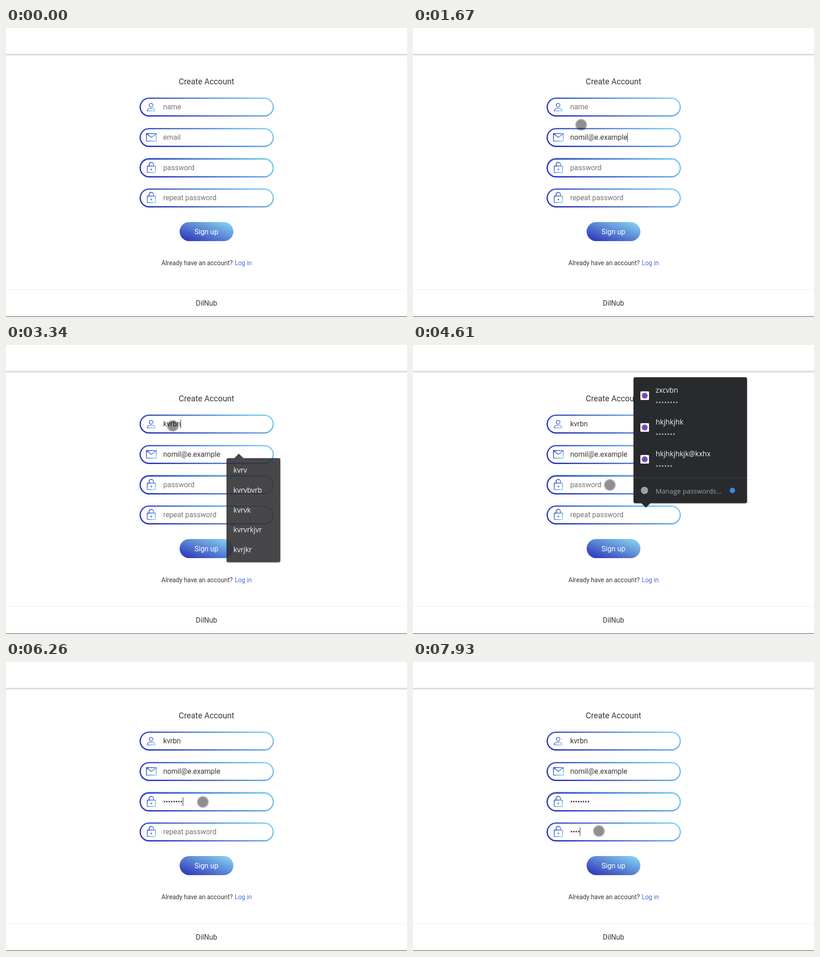
An HTML page that plays this animation: 880 by 636 pixels, repeating every 8000 ms.

```html
<!DOCTYPE html>
<html lang="en">
<head>
<meta charset="utf-8">
<title>Create Account</title>
<style>
  html, body { margin: 0; width: 100%; height: 100%; overflow: hidden; background: #fff; }
  #stage { position: relative; width: 880px; height: 636px; overflow: hidden; background: #fff;
    font: 15.75px/20px Roboto, sans-serif; color: #38383c; white-space: pre; }
  #stage div, #stage svg { position: absolute; }
  .center { left: 0; width: 880px; text-align: center; }
  .header { left: -10px; width: 900px; top: 0; height: 57px; background: #fff;
    box-shadow: 0 1px 5px rgba(0, 0, 0, .32); }
  .title { top: 108px; font-size: 17.75px; }
  .field { left: 292.7px; width: 295px; height: 42.3px; border-radius: 21.2px;
    background: linear-gradient(25deg, #292cb6, #8adcf4); }
  .field::before { content: ""; position: absolute; inset: 3.2px; border-radius: 18px; background: #fff; }
  .field svg { left: 14.3px; top: 9.2px; width: 24px; height: 24px; overflow: visible;
    fill: none; stroke: url(#ink); stroke-width: 1.7; }
  .field .value { left: 52.3px; top: 11.2px; }
  .hint { color: #757575; }
  .caret { display: inline-block; width: 1px; height: 19px; margin-right: -1px;
    vertical-align: top; background: #222; }
  .button { left: 380.5px; top: 427px; width: 118.3px; height: 42.2px; border-radius: 21.1px;
    line-height: 43px; text-align: center; color: #fff;
    background: linear-gradient(to top right, #292cb6, #8adcf4); }
  .login { left: 341px; top: 507px; font-size: 13.8px; }
  .link { left: 502px; color: #3c6bdc; }
  .footer { top: 575px; height: 60px; line-height: 60px; border-top: 1px solid #eee; box-sizing: border-box; }
  .edge { left: 0; top: 635px; width: 880px; height: 1px; background: #343735; }
  .popup { left: 484px; border-radius: 4px; background: #292a2d; color: #f4f5f7;
    box-shadow: 0 1px 3px rgba(0, 0, 0, .4); font: 15.5px/20px "Open Sans", "Noto Sans", sans-serif; }
  .popup::after { content: ""; position: absolute; left: 17px; top: -10px;
    border: solid transparent; border-width: 0 10.5px 10px; border-bottom-color: #292a2d; }
  .popup.above::after { top: 100%; border-width: 10px 10.5px 0; border-top-color: #292a2d; }
  .list { padding: 5.8px 0; }
  #stage .list div { position: static; padding-left: 15px; line-height: 43.6px; }
  .logins { width: 249px; height: 277px; }
  .logins .user { left: 48.5px; }
  .logins .dots { left: 48.5px; font: 17px/20px Roboto, sans-serif; letter-spacing: .5px; color: #a8adb3; }
  .tile { left: 14.5px; width: 19px; height: 19px; border-radius: 2px; background: #fff; }
  .disc { border-radius: 50%; }
  .rule { left: 0; top: 221px; width: 100%; height: 1px; background: #45474a; }
  .manage { left: 48.5px; top: 239.5px; font-size: 14.8px; color: #9aa0a6; }
  #cursor { left: 0; top: 0; width: 22px; height: 22px; margin: -13px; border: 2.5px solid rgba(0, 0, 0, .27);
    border-radius: 50%; background: rgba(0, 0, 0, .44) padding-box; }
</style>
</head>
<body>
<div id="stage">
  <svg width="0" height="0"><defs>
    <linearGradient id="ink" gradientUnits="userSpaceOnUse" x1="4" y1="4" x2="22" y2="22">
      <stop stop-color="#3038ba"/><stop offset="1" stop-color="#8adcf4"/>
    </linearGradient>
  </defs></svg>
  <div class="header"></div>
  <div class="center title">Create Account</div>
  <div class="button">Sign up</div>
  <div class="login">Already have an account?</div>
  <div class="login link">Log in</div>
  <div class="center footer">DilNub</div>
  <div class="edge"></div>
</div>
<script>
const stage = document.getElementById('stage');
const LOOP = 8000, STEP = 1000 / 15, BLINK = 530;

function add(parent, className, html = '', style = '') {
  const el = document.createElement('div');
  el.className = className;
  el.innerHTML = html;
  el.style.cssText = style;
  return parent.appendChild(el);
}

const lock = '<rect x="3" y="7.8" width="18" height="14.4" rx="1"/>' +
  '<path d="M7 8V4.5a4.8 4.8 0 0 1 9.6 0V8"/><circle cx="12" cy="15.5" r="2" fill="url(#ink)" stroke="none"/>';
const fields = [
  ['name', '<circle cx="11.5" cy="8" r="4"/><path d="M3 20.5c0-4 3-6 8.5-6s8.5 2 8.5 6z"/>'],
  ['email', '<path d="M1.3 3.3h21.4v16.6H1.3zl10.7 8.6 10.7-8.6"/>'],
  ['password', lock],
  ['repeat password', lock]
].map(([hint, icon], i) => {
  const el = add(stage, 'field', `<svg>${icon}</svg>`, `top:${152.8 + 66.8 * i}px`);
  return { hint, value: add(el, 'value') };
});

const listPopup = (top, width, items) =>
  add(stage, 'popup list', items.map(s => `<div>${s}</div>`).join(''), `top:${top}px;width:${width}px`);

const emails = listPopup(330.5, 220, ['hkjhkjhkjk@kxhx', 'dorin.kelsat@t.example',
  'dorimella@t.example', 'hkjhkjhkjk@kxhxkjhj', 'letterbox@to.example', 'marigold52@t.example']);
const names = listPopup(248.7, 118, ['kjhvr', 'kvrv', 'kvrvbvrb', 'kvrvk', 'kvrvrkjvr', 'kvrjkr']);
const logins = add(stage, 'popup above logins');
[['zxcvbn', 8], ['hkjhkjhk', 7], ['hkjhkjhkjk@kxhx', 6]].forEach(([user, length], i) => {
  const top = 70.2 * i;
  add(logins, 'user', user, `top:${top + 17.5}px`);
  add(logins, 'dots', '•'.repeat(length), `top:${top + 44.5}px`);
  add(logins, 'tile', '', `top:${top + 31}px`);
  add(logins, 'disc', '', `left:17.5px;top:${top + 34}px;width:13px;height:13px;background:#764abc`);
});
add(logins, 'rule');
add(logins, 'disc', '', 'left:16px;top:241px;width:16px;height:16px;background:#9aa0a6');
add(logins, 'manage', 'Manage passwords...');
add(logins, 'disc', '', 'left:210.5px;top:243px;width:12px;height:12px;background:#3f86e0');
const cursor = add(stage, '');
cursor.id = 'cursor';

// [time, field, text, caret hidden]
const edits = [
  [940, 1, ''], [1540, 1, 'nomil@e.example'],
  [2130, 0, ''], [3070, 0, 'k'], [3270, 0, 'kvr'], [3340, 0, 'kvrbn'],
  [4140, 2, ''], [4610, 2, '', true],
  ...[4670, 4870, 5140, 5400, 5600, 5860, 6060, 6260].map((t, i) => [t, 2, '•'.repeat(i + 1)]),
  [6930, 3, ''],
  ...[7270, 7470, 7730, 7930].map((t, i) => [t, 3, '•'.repeat(i + 1)])
];

// [time, x, y]
const path = [
  [70, 763.5, 593.5], [600, 395, 222], [870, 405, 245], [1400, 405, 245], [1670, 369, 213],
  [1940, 366, 178], [3340, 366, 178], [3940, 432, 308], [6330, 432, 308], [6900, 408, 372]
];

function cursorAt(t) {
  const next = path.findIndex(p => p[0] > t);
  if (next < 0) return path[path.length - 1].slice(1);
  const [t0, x0, y0] = path[Math.max(next - 1, 0)], [t1, x1, y1] = path[next];
  const u = Math.min(Math.max((t - t0) / (t1 - t0 || 1), 0), 1), k = u * u * (3 - 2 * u);
  return [x0 + (x1 - x0) * k, y0 + (y1 - y0) * k];
}

// Opens at once, closes in two visible fade steps.
function popupOpacity(t, open, close) {
  if (t < open || t >= close + 130) return 0;
  return t < close ? 1 : t < close + 65 ? .86 : .35;
}

function showFields(t) {
  const texts = ['', '', '', ''];
  let last = null;
  for (const edit of edits) {
    if (edit[0] > t) break;
    texts[edit[1]] = edit[2];
    last = edit;
  }
  const caretOn = last && !last[3] && (t - last[0]) % (2 * BLINK) < BLINK;
  fields.forEach(({ hint, value }, i) => {
    const caret = caretOn && last[1] === i ? '<span class="caret"></span>' : '';
    const html = texts[i] ? texts[i] + caret : `${caret}<span class="hint">${hint}</span>`;
    if (value.dataset.html !== html) value.innerHTML = value.dataset.html = html;
  });
}

function render(t) {
  showFields(t);
  emails.style.opacity = popupOpacity(t, 940, 1540);
  names.style.opacity = popupOpacity(t, 3070, 3340);
  names.firstChild.style.display = t < 3270 ? '' : 'none';
  const repeat = t >= 6000;
  logins.style.top = repeat ? '152px' : '71px';
  logins.style.opacity = repeat ? popupOpacity(t, 6930, 7270) : popupOpacity(t, 4140, 4670);
  const [x, y] = cursorAt(Math.floor(t / STEP + .1) * STEP);
  cursor.style.transform = `translate(${x}px, ${y}px)`;
  cursor.style.visibility = t < 70 ? 'hidden' : 'visible';
}

const start = performance.now();
function tick() {
  render((performance.now() - start) % LOOP);
  requestAnimationFrame(tick);
}
tick();
</script>
</body>
</html>
```
